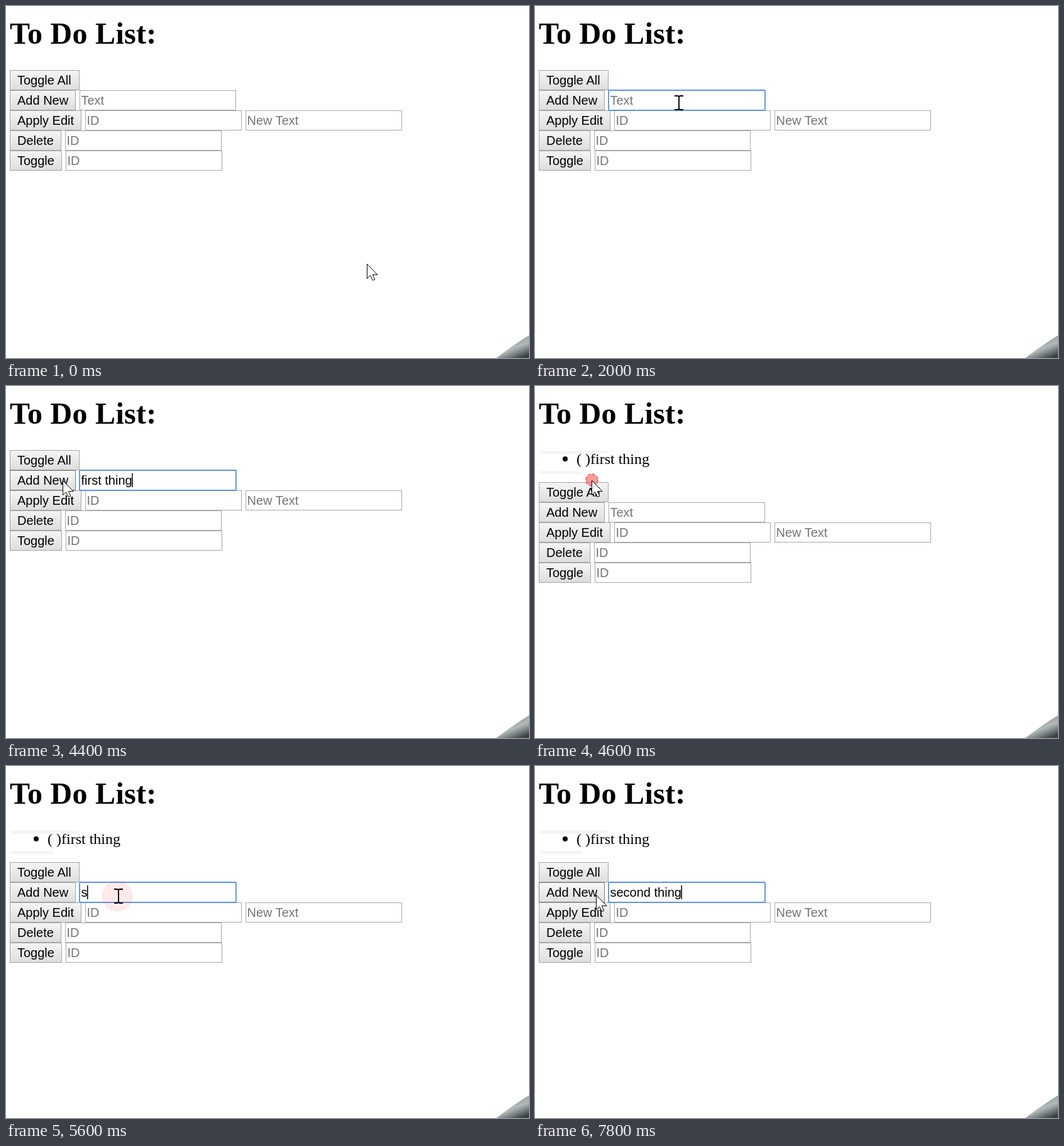
These frames come from a looping animation (832 px wide and 560 px high, 8000 ms). An HTML page:

```html
<!DOCTYPE html>
<html lang="en">
<head>
<meta charset="utf-8">
<title>To Do List</title>
<style>
  html, body { margin: 0; width: 100%; height: 100%; overflow: hidden; background: #fff; }
  svg { display: block; width: 832px; height: 560px; }
  text { white-space: pre; font: 20px "Liberation Sans", Arial, sans-serif; }
  .title { font: bold 48px "Liberation Serif", "Times New Roman", serif; letter-spacing: .3px; }
  .item { font: 24px "Liberation Serif", "Times New Roman", serif; }
  .button { fill: url(#face); stroke: #a6a6a6; }
  .button.hover { fill: url(#faceHover); stroke: #7c7c7c; }
  .input { fill: #fff; stroke: #a9a9a9; }
  .hint { fill: #757575; }
</style>
</head>
<body>
<svg viewBox="0 0 832 560">
  <defs>
    <linearGradient id="face" x2="0" y2="1">
      <stop stop-color="#f5f5f5"/><stop offset="1" stop-color="#dddddd"/>
    </linearGradient>
    <linearGradient id="faceHover" x2="0" y2="1">
      <stop stop-color="#f8f8f8"/><stop offset="1" stop-color="#e0e0e0"/>
    </linearGradient>
    <linearGradient id="metal" x1=".3" y1=".25" x2=".75" y2="1">
      <stop stop-color="#8d9393"/><stop offset=".45" stop-color="#b4baba"/>
      <stop offset=".7" stop-color="#7e8787"/><stop offset="1" stop-color="#394243"/>
    </linearGradient>
  </defs>

  <path d="M832 524Q809 538 780 560H832Z" fill="url(#metal)"/>
  <text class="title" x="6" y="59.5">To Do List:</text>

  <g id="list">
    <path d="M7 103h109v5H7zM7 135h68v5H7z" fill="#f5f5f5"/>
    <circle cx="48" cy="116" r="4"/>
    <text class="item" x="66" y="123.5">( )first thing</text>
  </g>

  <g id="form"></g>

  <g id="entry">
    <rect x="117" y="134" width="249" height="32" rx="1" fill="none" stroke="#5b94e8" stroke-width="1.8"/>
    <text id="typed" x="119.5" y="157"></text>
    <rect id="caret" y="139" width="1.5" height="22"/>
  </g>

  <circle id="ripple" fill="#ff5a64" fill-opacity=".85" stroke="#e0202c" stroke-width="1.6" stroke-dasharray="5 2.5"/>

  <path id="arrow" d="M.5 .5V23.5L5.6 18.8 9.4 26.5 12.8 25 9.4 17.5H17Z" fill="#fff" stroke="#000"/>
  <path id="beam" d="M-7-11h5.5L0-9.5 1.5-11H7M0-10V10M-7 11h5.5L0 9.5 1.5 11H7" fill="none" stroke="#000" stroke-width="1.9"/>
</svg>

<script>
const LOOP = 8000, STEP = 200, ROW = 32, TOP = 102, INPUT_WIDTH = 249, SHIFT = 51;
const $ = id => document.getElementById(id);

const rows = [
  { label: 'Toggle All', width: 111, inputs: [] },
  { label: 'Add New', width: 105, inputs: [[117, 'Text']] },
  { label: 'Apply Edit', width: 114, inputs: [[126, 'ID'], [381, 'New Text']] },
  { label: 'Delete', width: 82, inputs: [[94, 'ID']] },
  { label: 'Toggle', width: 83, inputs: [[95, 'ID']] }
];

const moves = [
  { start: 200, end: 1400, from: [574, 410], to: [229, 154] },
  { start: 3800, end: 4400, from: [229, 154], to: [90, 150] },
  { start: 4600, end: 5200, from: [90, 150], to: [179, 207] },
  { start: 7200, end: 7800, from: [179, 207], to: [97, 205] }
];

// Each click shows for two steps: [radius, opacity]
const clicks = [
  { time: 1600, at: [227, 154], rings: [[12.5, .6], [23.5, .15]] },
  { time: 4600, at: [90.5, 149.5], rings: [[9.5, .72], [20.5, .25]] },
  { time: 5400, at: [177, 207], rings: [[12.5, .6], [23.5, .15]] }
];

// Text in the focused field; null means no focus
const typing = [
  [0, null], [1600, ''], [2400, 'f'], [2600, 'fir'], [2800, 'first'], [3000, 'first th'],
  [3200, 'first thin'], [3400, 'first thing'], [4600, null], [5400, ''], [5600, 's'],
  [5800, 'se'], [6200, 'seco'], [6400, 'second'], [6600, 'second thi'], [6800, 'second thing']
];
const caretOff = [[2000, 2400], [4000, 4400], [7400, 7800]];

function add(tag, attrs, text = '') {
  const node = document.createElementNS('http://www.w3.org/2000/svg', tag);
  for (const name in attrs) node.setAttribute(name, attrs[name]);
  node.textContent = text;
  return $('form').appendChild(node);
}

function addBox(type, x, y, width) {
  const node = add('rect', { class: type, x: x + .5, y: y + .5, width: width - 1, height: ROW - 1 });
  return { node, x, y, width };
}

const buttons = [], inputs = [];
let hint;
rows.forEach((row, i) => {
  const y = TOP + i * ROW;
  buttons.push(addBox('button', 6, y, row.width));
  add('text', { x: 18, y: y + 23 }, row.label);
  for (const [x, label] of row.inputs) {
    inputs.push(addBox('input', x, y, INPUT_WIDTH));
    const node = add('text', { class: 'hint', x: x + 2.5, y: y + 23 }, label);
    if (label === 'Text') hint = node;
  }
});

const show = (node, on) => node.setAttribute('visibility', on ? 'visible' : 'hidden');
const place = (node, x, y) => node.setAttribute('transform', `translate(${x} ${y})`);
const inside = (box, x, y) =>
  x >= box.x && x < box.x + box.width && y >= box.y && y < box.y + ROW;

function pointerAt(t) {
  const { start, end, from, to } = moves.findLast(m => t >= m.start) || moves[0];
  const p = Math.min(1, Math.max(0, (t - start) / (end - start)));
  const eased = Math.sin(p * Math.PI / 2);
  return from.map((v, i) => Math.round(v + (to[i] - v) * eased));
}

function draw(t) {
  const added = t >= 4600;
  const offset = added ? SHIFT : 0;
  show($('list'), added);
  place($('form'), 0, offset);
  place($('entry'), 0, offset);

  const text = typing.findLast(([time]) => t >= time)[1];
  const focused = text !== null;
  $('entry').setAttribute('display', focused ? 'inline' : 'none');
  show(hint, !text);
  if (focused) {
    $('typed').textContent = text;
    const width = text ? $('typed').getComputedTextLength() : 0;
    $('caret').setAttribute('x', 120 + Math.max(0, width - 1));
    show($('caret'), !caretOff.some(([from, to]) => t >= from && t < to));
  }

  const [x, y] = pointerAt(t);
  const overInput = inputs.some(box => inside(box, x, y - offset));
  buttons.forEach(box => box.node.classList.toggle('hover', inside(box, x, y - offset)));
  show($('arrow'), !overInput);
  show($('beam'), overInput);
  place($('arrow'), x, y);
  place($('beam'), x, y);

  const click = clicks.find(c => t >= c.time && t < c.time + 2 * STEP);
  show($('ripple'), click);
  if (click) {
    const [radius, opacity] = click.rings[(t - click.time) / STEP];
    place($('ripple'), ...click.at);
    $('ripple').setAttribute('r', radius);
    $('ripple').setAttribute('opacity', opacity);
  }
}

const origin = performance.now();
function tick() {
  const t = (performance.now() - origin) % LOOP;
  draw(Math.floor(t / STEP) * STEP);
  requestAnimationFrame(tick);
}
tick();
</script>
</body>
</html>
```
